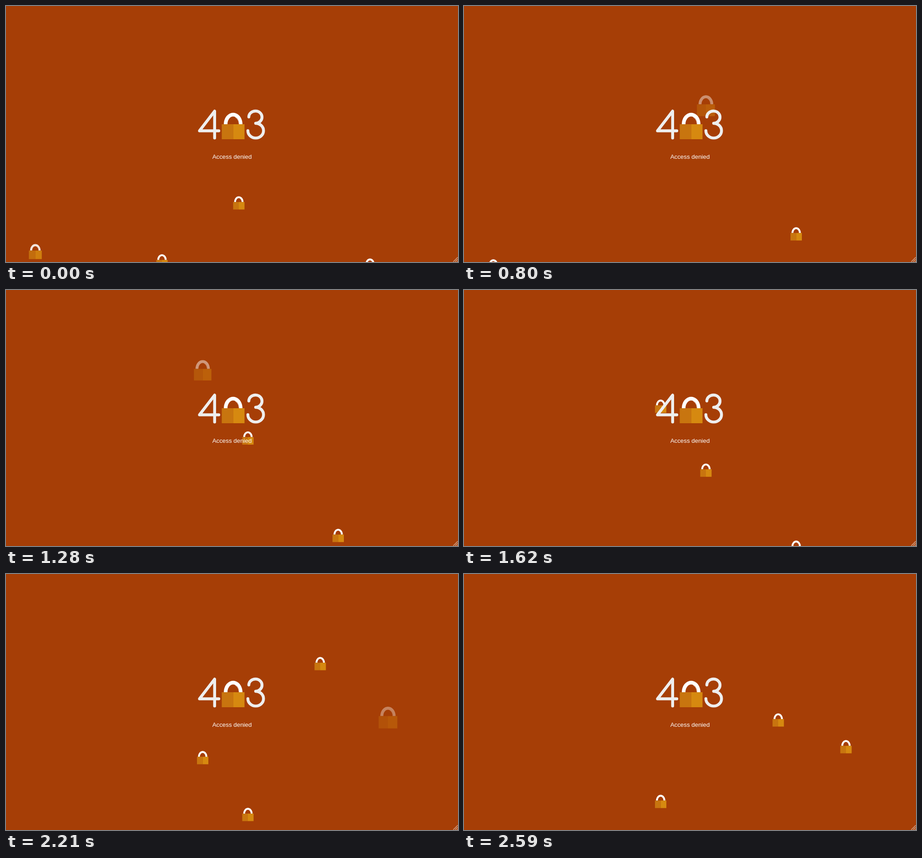
Write an HTML page that moves like this. It is 994 by 563 pixels and loops after 2.69 s.

```html
<!DOCTYPE html>
<html lang="en">
<head>
<meta charset="utf-8">
<title>403</title>
<style>
  html, body { margin: 0; width: 100%; height: 100%; overflow: hidden; background: #a63e06; }
  svg { display: block; position: absolute; left: 0; top: 0; }
  text { font: 13.333px "Liberation Sans", Arial, sans-serif; fill: #fff; text-anchor: middle; }
  .digit { fill: none; stroke: #eee; stroke-width: 6.4; stroke-linecap: round; stroke-linejoin: round; }
  .grip { stroke: #d9b5a3; stroke-width: 1.2; }
</style>
</head>
<body>
<svg width="994" height="563" viewBox="0 0 994 563">
  <defs>
    <g id="lock">
      <path fill="#fff" d="M-20.5 -4A20.5 25.3 0 0 1 20.5 -4H12.5A12.5 17 0 0 0 -12.5 -4Z"/>
      <path fill="none" stroke="#efd6ca" stroke-width="1.6" d="M5 -19.8Q13 -15.5 13.3 -4"/>
      <path fill="#c8750f" d="M-25 -4H0V29H-25Z"/>
      <path fill="#d68910" d="M0 -4H25V29H0Z"/>
    </g>
  </defs>
  <g id="falling"></g>
  <path class="digit" d="M468 274.5H425.5L458.8 231.2V290.2"/>
  <path class="digit" d="M534 244A14.5 13.3 0 0 1 563 244.5A14.5 13.5 0 0 1 549 258A17.2 16.2 0 1 1 531.9 274.2"/>
  <use href="#lock" x="499.5" y="264"/>
  <text x="497" y="336">Access denied</text>
  <path class="grip" d="M983.5 562.5L993.5 552.5M987.5 562.5L993.5 556.5M991.5 562.5L993.5 560.5"/>
</svg>
<script>
const LOOP = 2690, LAST = 2590, STEP = 40;
const FIRST = -1670, BEAT = 471;              // one new lock per beat
const SHRINK = 450, FALL = 1850, FLOOR = 603; // each falls to the floor at its own even speed

// Where each lock appears: [x, y] of its centre, in order of birth
const locks = [
  [800.5, 264], [512, 120], [343, 533], [64.5, 530], [730.5, 454],
  [532, 194], [432.5, 146], [691, 15], [840, 299]
];

const layer = document.getElementById('falling');
layer.innerHTML = '<use href="#lock"/>'.repeat(locks.length);

const bezier = (a, b, u) => 3 * a * u * (1 - u) ** 2 + 3 * b * u * u * (1 - u) + u ** 3;

// CSS "ease", solved by bisection
function ease(t) {
  if (t <= 0) return 0;
  if (t >= 1) return 1;
  let lo = 0, hi = 1;
  for (let i = 0; i < 20; i++) {
    const mid = (lo + hi) / 2;
    if (bezier(.25, .25, mid) < t) lo = mid; else hi = mid;
  }
  return bezier(.1, 1, lo);
}

function draw(time) {
  const now = time % LOOP;
  const t = now < LAST ? Math.floor(now / STEP) * STEP : LAST;
  locks.forEach(([x, top], i) => {
    const age = t - FIRST - i * BEAT;
    const p = ease(age / SHRINK);
    const y = top + (FLOOR - top) * age / FALL;
    const el = layer.children[i];
    el.setAttribute('opacity', p);
    el.setAttribute('transform', `translate(${x} ${y}) scale(${1 - p / 2})`);
  });
}

const begin = performance.now();
function frame() {
  draw(performance.now() - begin);
  requestAnimationFrame(frame);
}
frame();
</script>
</body>
</html>
```
